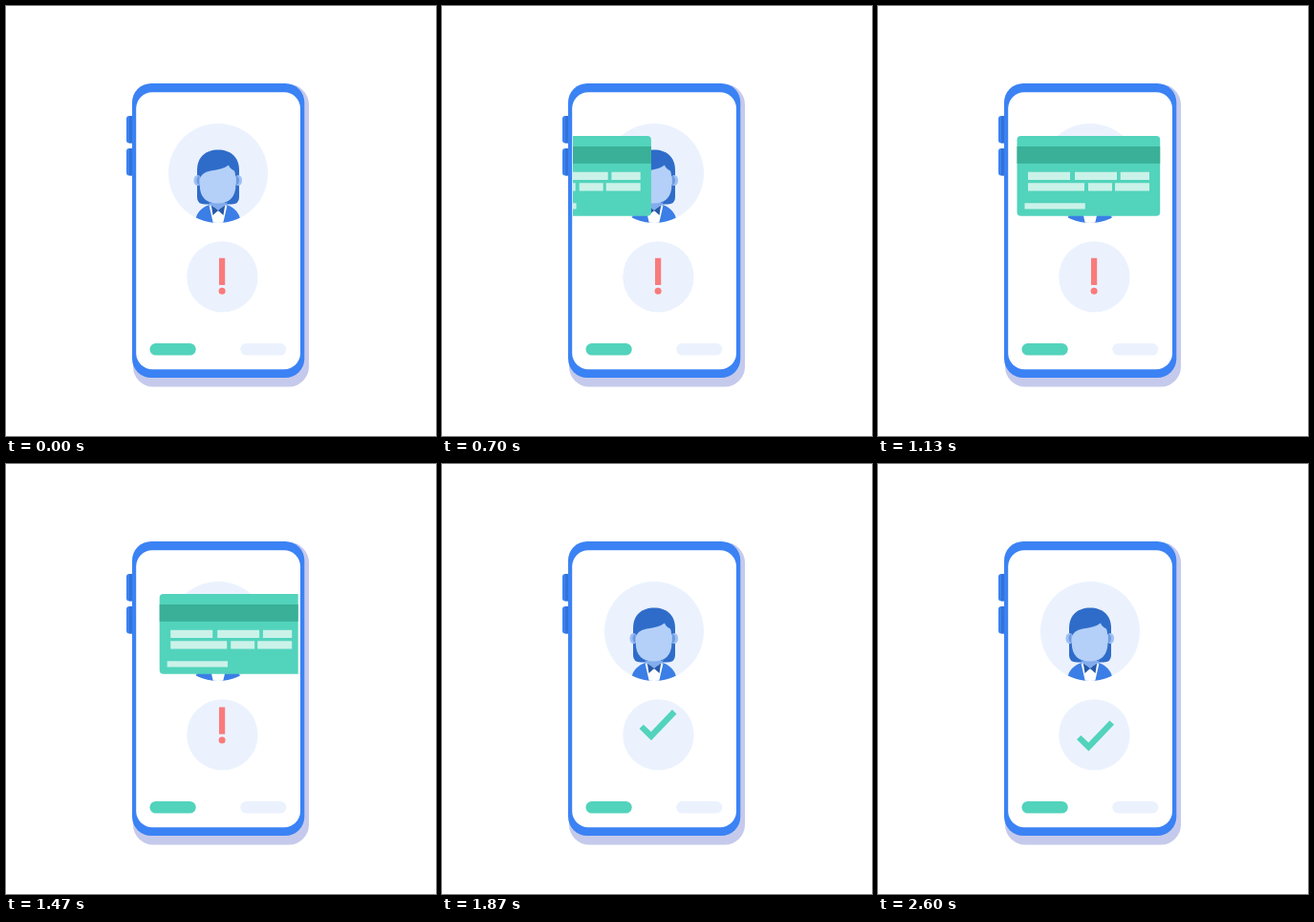
An HTML page that plays this animation: 450x450 px, repeating every 2630 ms.

```html
<!DOCTYPE html>
<html lang="en">
<head>
<meta charset="utf-8">
<title>Card check</title>
<style>
  html, body { margin: 0; width: 100%; height: 100%; overflow: hidden; background: #fff; }
  svg { display: block; width: 100vw; height: 100vh; }
</style>
</head>
<body>
<svg viewBox="0 0 450 450">
  <defs>
    <clipPath id="screen"><rect x="137" y="91" width="168.7" height="289"/></clipPath>
    <clipPath id="portrait"><circle cx="222" cy="175" r="52"/></clipPath>
    <clipPath id="badge"><circle cx="226.4" cy="283.4" r="37.2"/></clipPath>
  </defs>

  <!-- phone -->
  <rect x="133" y="82" width="184" height="316.5" rx="21" fill="#c5caec"/>
  <g fill="#3b82f4">
    <rect x="126" y="115" width="12" height="28.5" rx="3"/>
    <rect x="126" y="149" width="12" height="28.5" rx="3"/>
  </g>
  <path d="M129 115h4v28.5h-4zM129 149h4v28.5h-4z" fill="#2f6ccb" opacity=".7"/>
  <rect x="132" y="81" width="180.3" height="308" rx="20" fill="#3b82f4"/>
  <rect x="136.2" y="90.3" width="171.8" height="290" rx="17" fill="#fff"/>
  <rect x="150.5" y="353" width="48.2" height="12.6" rx="6.3" fill="#52d3bc"/>
  <rect x="245.3" y="353" width="48" height="12.6" rx="6.3" fill="#ebf2fe"/>

  <!-- portrait -->
  <circle cx="222" cy="175" r="52" fill="#ebf2fe"/>
  <g clip-path="url(#portrait)">
    <path d="M200 172C200 158 209 150.5 222 150.5S244 158 244 172V200Q244 207.5 236 207.5H208Q200 207.5 200 200Z" fill="#2f6cc9"/>
    <path d="M215 200H229V211L222 217L215 211Z" fill="#82acec"/>
    <path d="M198 228Q198 213 213 208L222 219L231 208Q245 213 246 228Z" fill="#3b7ee6"/>
    <path d="M212.500 208.500L222 215L231.500 208.500L227 228H217Z" fill="#fff"/>
    <path d="M214.500 206.500L222 214L216.500 219ZM229.500 206.500L222 214L227.500 219Z" fill="#285aa8"/>
    <path d="M212 205Q222 211 232 205L229 209L222 213.500L215 209Z" fill="#82acec"/>
    <ellipse cx="200.500" cy="182.500" rx="4" ry="5.500" fill="#9dc0f3"/>
    <ellipse cx="243" cy="182.500" rx="4" ry="5.500" fill="#9dc0f3"/>
    <path d="M202.500 177.500v10q-3-1-3-5t3-5M241 177.500v10q3-1 3-5t-3-5" fill="#6d9be2"/>
    <path d="M202.700 182Q204 174 214 172.500Q227 171 233 166.500Q234 170 239 172.500Q240.500 176 240.500 187Q240 206.500 221.600 206.500Q203 206.500 202.700 187Z" fill="#b4d0f8"/>
  </g>

  <!-- status -->
  <circle cx="226.400" cy="283.400" r="37.200" fill="#ebf2fe"/>
  <g clip-path="url(#badge)">
    <g id="alert" fill="#f97b7b">
      <rect x="223" y="263.800" width="6.200" height="28.200"/>
      <circle cx="226.100" cy="298.200" r="3.500"/>
    </g>
    <path id="tick" d="M208 288.300L212.400 284L220.300 291.600L242.400 268.400L247 272.800L220.500 300.500Z" fill="#52d3bc"/>
  </g>

  <!-- card, drawn at its resting place -->
  <g clip-path="url(#screen)">
    <g id="card">
      <rect x="145.500" y="136" width="149.700" height="83.700" rx="4" fill="#52d3bc"/>
      <rect x="145.500" y="147" width="149.700" height="17.800" fill="#39b097"/>
      <path fill="#cbf2e9" d="M157 173.700h44v8.300h-44zM206 173.700h44v8.300h-44zM253.700 173.700h30.300v8.300h-30.300zM157 185.300h59v8.300h-59zM220 185.300h25v8.300h-25zM248 185.300h36v8.300h-36zM153.500 206.200h63.300v6.300h-63.300z"/>
    </g>
  </g>
</svg>
<script>
  const LOOP = 2630;
  const [card, alertMark, tick] = ["card", "alert", "tick"].map(id => document.getElementById(id));

  const easeIn = p => k => k ** p;
  const easeOut = p => k => 1 - (1 - k) ** p;
  const smooth = k => k * k * (3 - 2 * k);

  // Each step: [end time, value, ease towards it]
  const cardX = [[545, -160], [1070, 0, easeOut(2.1)], [1300, 0], [1800, 161, easeIn(2.2)]];
  const alertY = [[1300, 0], [1650, -60, easeIn(2.6)]];
  const tickY = [[1600, 56], [1850, -11.5, easeOut(2)], [2180, 4, smooth], [2500, 0, smooth]];
  const tickX = [[2200, -1.5], [2500, 0, smooth]];

  function at(steps, t) {
    let [t0, v0] = steps[0];
    for (const [t1, v1, ease = k => k] of steps) {
      if (t <= t1) return t1 === t0 ? v0 : v0 + (v1 - v0) * ease(Math.max(0, (t - t0) / (t1 - t0)));
      t0 = t1;
      v0 = v1;
    }
    return v0;
  }

  function place(el, x, y, visible) {
    el.setAttribute("transform", `translate(${x.toFixed(2)} ${y.toFixed(2)})`);
    el.setAttribute("visibility", visible ? "visible" : "hidden");
  }

  function draw(t) {
    place(card, at(cardX, t), 0, t >= 570 && t < 1800);
    place(alertMark, 0, at(alertY, t), t < 1650);
    place(tick, at(tickX, t), at(tickY, t), t >= 1600);
  }

  const start = performance.now();
  function loop() {
    draw((performance.now() - start) % LOOP);
    requestAnimationFrame(loop);
  }
  loop();
</script>
</body>
</html>
```
